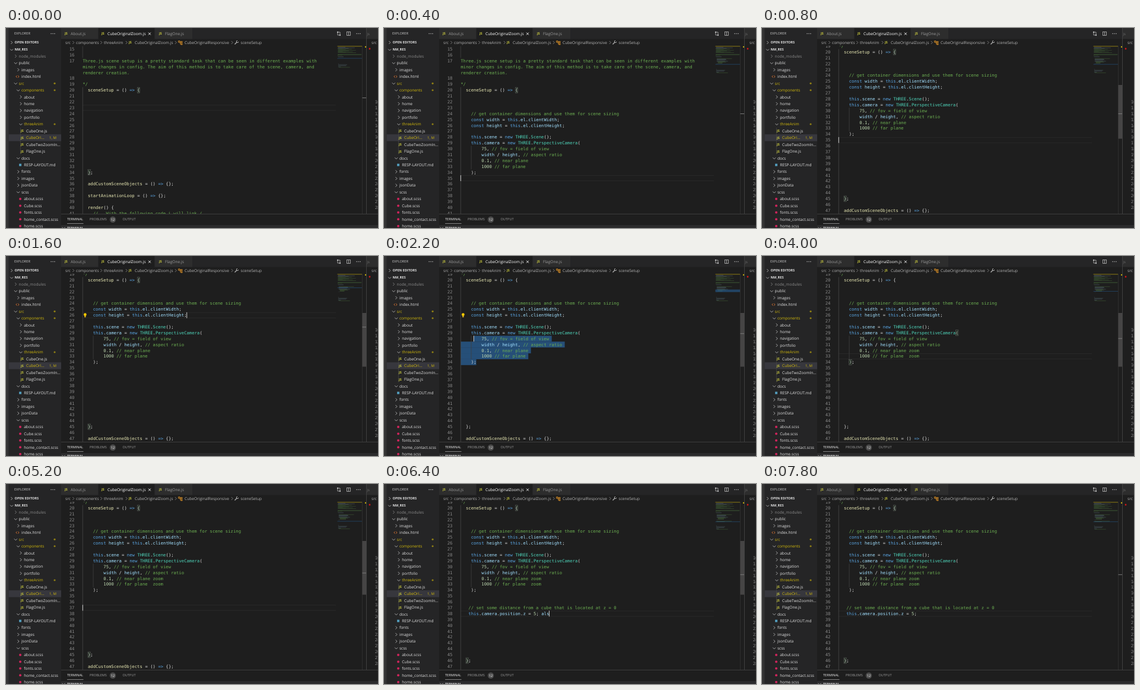
Animation, 627 px wide and 337 px high, one loop 8000 ms. Source, as an HTML page with a canvas:

```html
<!DOCTYPE html>
<html lang="en">
<head>
<meta charset="utf-8">
<title>Code editor</title>
<style>
html, body { margin: 0; width: 100%; height: 100%; overflow: hidden; background: #1e1e1e; }
canvas { display: block; }
</style>
</head>
<body>
<canvas id="stage" width="627" height="337"></canvas>
<script>
const g = document.getElementById('stage').getContext('2d');
const LOOP = 8000, STEP = 200;
const UI = '"Open Sans", "Noto Sans", sans-serif';
const MONO = '7.285px "DejaVu Sans Mono", monospace';
const CW = 4.386, LH = 9.887, CODE_X = 129.2, TOP = 30, BOTTOM = 313;
const WARN = '#d0b80c', JS = '#d6d640', GREEN = '#6cae52', TEXT = '#e0e0e0';

// ---------- drawing helpers ----------
function box(x, y, w, h, color) {
  g.fillStyle = color;
  g.fillRect(x, y, w, h);
}
function line(color, width, ...pts) {
  g.strokeStyle = color;
  g.lineWidth = width;
  g.beginPath();
  for (let i = 0; i < pts.length; i += 2) g.lineTo(pts[i], pts[i + 1]);
  g.stroke();
}
function dot(x, y, r, color) {
  g.fillStyle = color;
  g.beginPath();
  g.arc(x, y, r, 0, 7);
  g.fill();
}
function label(s, x, y, color = TEXT, size = 6.6, weight = 400) {
  g.font = `${weight} ${size}px ${UI}`;
  g.fillStyle = color;
  g.fillText(s, x, y + size * 0.355);
}
function chevron(x, y, open, color = '#c5c5c5') {
  if (open) line(color, 0.8, x - 2.5, y - 1, x, y + 1.5, x + 2.5, y - 1);
  else line(color, 0.8, x - 1.2, y - 2.5, x + 1.3, y, x - 1.2, y + 2.5);
}
const jsIcon = (x, y) => label('JS', x, y, JS, 5.3, 700);
function dots(x, y) {
  for (let i = -1; i < 2; i++) dot(x + i * 2.9, y, 0.7, '#c5c5c5');
}

// ---------- file tree: depth, kind, name ----------
const tree = `1 > node_modules
1 v public
2 > images
2 h index.html
1 v src *
2 v components *
3 > about
3 > home
3 > navigation
3 > portfolio
3 v threeAnim *
4 j CubeOne.js
4 j CubeOri… !
4 j CubeTwoZoomIn…
4 j FlagOne.js
2 v docs
3 m RESP-LAYOUT.md
2 > fonts
2 > images
2 > jsonData
2 v scss
3 s about.scss
3 s Cube.scss
3 s fonts.scss
3 s home_contact.scss
3 s home.scss`.split('\n').map(r => r.split(' '));

function drawSidebar() {
  box(0, 0, 93, 337, '#252526');
  box(0, 0, 4.5, 337, '#333333');
  label('EXPLORER', 14, 9.5, '#c8c8c8', 5.6);
  dots(79, 9.5);
  chevron(9.5, 24.5, false);
  label('OPEN EDITORS', 14.5, 24.5, TEXT, 5.6, 700);
  chevron(9.5, 36.5, true);
  label('NM_RES', 14.5, 36.5, TEXT, 5.6, 700);
  box(4.5, 179.2, 88.5, 11.4, '#37373d');
  line('#4a4a4a', 0.7, 24.3, 168, 24.3, 213);
  tree.forEach(([depth, kind, name, mark], i) => {
    const y = 47.5 + i * 11.45, x = 12 + depth * 4.3;
    const color = mark ? WARN : i ? TEXT : '#8c8c8c';
    if (kind === '>' || kind === 'v') chevron(x, y, kind === 'v', i ? '#c5c5c5' : '#8c8c8c');
    if (kind === 'j') jsIcon(25, y);
    if (kind === 'h') {
      line('#e37933', 0.9, 18.6, y - 1.8, 16.8, y, 18.6, y + 1.8);
      line('#e37933', 0.9, 20.2, y - 1.8, 22, y, 20.2, y + 1.8);
    }
    if (kind === 'm') box(22, y - 2, 4, 4, '#519aba');
    if (kind === 's') dot(24, y, 2, '#d0245c');
    const tx = kind === 'j' ? 34 : kind === 'h' ? 26 : 17.3 + depth * 4.3;
    label(name, tx, y, color);
    if (mark === '*') dot(82, y, 1.6, '#8f7f14');
    if (mark === '!') label('1, M', 73, y, WARN, 6);
  });
}

// ---------- tabs, breadcrumbs, panel ----------
function drawTabs() {
  box(93, 0, 534, 18.5, '#252526');
  box(93, 0, 62, 18.5, '#2d2d2d');
  box(156, 0, 94, 18.5, '#1e1e1e');
  box(251, 0, 63, 18.5, '#2d2d2d');
  [[99, 'About.js'], [161, 'CubeOriginalZoom.js'], [258, 'FlagOne.js']].forEach(([x, name], i) => {
    jsIcon(x, 9.5);
    label(name, x + 10, 9.3, i === 1 ? '#ffffff' : '#9c9c9c');
  });
  line('#ffffff', 0.9, 240, 7.7, 244, 11.7);
  line('#ffffff', 0.9, 244, 7.7, 240, 11.7);
  const c = '#b8b8b8';
  line(c, 0.8, 559, 8, 559, 12, 562, 12);
  line(c, 0.8, 560, 7, 563, 7, 563, 11);
  dot(559, 7, 1.2, c);
  dot(563, 12, 1.2, c);
  g.strokeRect(574.5, 6.5, 6, 6);
  line(c, 0.8, 577.5, 6.5, 577.5, 12.5);
  dots(594, 9.5);
}
function drawCrumbs() {
  const y = 24.5, c = '#b4b4b4';
  [[100, 'src'], [118, 'components'], [165, 'threeAnim'], [217, 'CubeOriginalZoom.js'],
   [301, 'CubeOriginalResponsive'], [395.5, 'sceneSetup']].forEach(([x, s]) => label(s, x, y, c));
  [113.5, 160.5, 203, 286, 381].forEach(x => chevron(x, y, false, '#8c8c8c'));
  jsIcon(207, y);
  g.strokeStyle = '#ee9d28';
  g.lineWidth = 0.8;
  g.strokeRect(290.7, 21.8, 2.3, 2.3);
  g.strokeRect(295, 22.8, 2, 1.8);
  g.strokeRect(295, 26.2, 2, 1.8);
  line('#ee9d28', 0.8, 293, 23.5, 295, 23.5);
  line('#ee9d28', 0.8, 293.7, 23.5, 293.7, 27, 295, 27);
  line('#b4b4b4', 1.2, 385.5, 27.5, 389, 24);
  g.lineWidth = 1;
  g.beginPath();
  g.arc(390, 23, 1.7, 0, 4.8);
  g.stroke();
}
function drawPanel() {
  box(93, BOTTOM, 534, 24, '#1e1e1e');
  box(93, BOTTOM, 534, 0.8, '#454545');
  label('TERMINAL', 103, 322.5, '#f0f0f0', 5.6);
  box(103, 329, 27.5, 0.7, '#b0b0b0');
  label('PROBLEMS', 141, 322.5, '#9c9c9c', 5.6);
  dot(180, 322.8, 5.2, '#4d4d4d');
  g.textAlign = 'center';
  label('12', 180, 322.8, '#ffffff', 5.6);
  g.textAlign = 'left';
  label('OUTPUT', 196.5, 322.5, '#9c9c9c', 5.6);
  box(93, 332, 534, 5, '#2b2b2c');
  chevron(97, 336.7, true);
  label('TERMINAL', 103, 336.7, TEXT, 5.4, 700);
}
function drawSecondGroup() {
  box(607, 0, 20, BOTTOM, '#1e1e1e');
  box(608, 0, 19, 18.5, '#2d2d2d');
  label('js', 608.5, 9.5, '#6b6b6b', 6);
  box(607, 0, 0.9, BOTTOM, '#444444');
  label('src', 616, 24.5, '#b4b4b4');
  dot(613, 35, 1.4, '#d01818');
  g.font = MONO;
  g.fillStyle = '#858585';
  for (let n = 10; n < 29; n++) {
    g.fillText(n, 621.7, 124.4 + (n - 10) * LH + 2.6);
  }
}

// ---------- document ----------
const intro = [
  'Three.js scene setup is a pretty standard task that can be seen in different examples with',
  'minor changes in config. The aim of this method is to take care of the scene, camera, and',
  'renderer creation.'];
const setup = s => `    // get container dimensions and use them for scene sizing
    const width = this.el.clientWidth;
    const height = this.el.clientHeight;

    this.scene = new THREE.Scene();
    this.camera = new THREE.PerspectiveCamera(
        75, // fov = field of view
        width / height, // aspect ratio
        0.1, // near plane${s.near}
        1000 // far plane${s.far}
    );`.split('\n');
const blank = n => Array(n).fill('');

// Rows are [line number, text]; wrapped rows have no number.
function buildRows(s) {
  let body = blank(13);
  if (s.pasted) {
    const rest = s.note ? [...blank(2), s.note, s.tail, ...blank(7)] : blank(10);
    body = [...blank(3), ...setup(s), ...rest];
  }
  const lines = ['', '', intro, '', '*/', '  sceneSetup = () => {', ...body, '  };', '',
    '  addCustomSceneObjects = () => {};', '', '  startAnimationLoop = () => {};', '',
    '  render() {', '    //   With the following code i will link /', '', '', ''];
  return lines.flatMap((text, i) =>
    [].concat(text).map((part, k) => [k ? 0 : i + 15, part]));
}

const NOTE = '   // set some distance from a cube that is located at z = 0';
const MOVE = '   this.camera.position.z = 5;';
const outer = { match: 'outer' }, inner = { match: 'inner' }, none = { match: '' };
// Each entry changes the editor state from its time on.
const keys = [
  [-500, { scroll: 0, line: 23, col: 0, near: '', far: '', tail: '', ...outer }],
  [400, { pasted: true, line: 35 }],
  [600, { scroll: 3.5, slider: true }],
  [800, { scroll: 6.5 }],
  [1400, { line: 26, col: 40, bulb: true }],
  [1800, { line: 33, col: 8, sel: true, ...none }],
  [2000, { line: 31, col: 6 }],
  [2200, { line: 30, col: 5 }],
  [2600, { line: 32, col: 26, sel: false, bulb: false, ...inner }],
  [2800, { near: ' z', col: 28 }],
  [3000, { near: ' zoom', col: 31 }],
  [3200, { line: 33, col: 25 }],
  [3400, { far: '  zoom', col: 31 }],
  [5000, { line: 37, col: 0, ...outer }],
  [5800, { note: NOTE, tail: '', line: 37, col: 60 }],
  [6000, { tail: MOVE, line: 38, col: 30 }],
  [6200, { tail: MOVE + ' a', col: 32 }],
  [6400, { tail: MOVE + ' als', col: 34 }],
  [6600, { tail: MOVE + ' also', col: 35 }],
  [7000, { tail: MOVE + ' a', col: 32 }],
  [7200, { tail: MOVE, col: 30, slider: false }]
];
function stateAt(t) {
  const past = keys.filter(([at]) => at <= t);
  const s = Object.assign({}, ...past.map(k => k[1]));
  s.blink = (t - past[past.length - 1][0]) % 1000 < 500;
  return s;
}

// ---------- code ----------
const TOKEN = /\/\/.*|=>|\d+(\.\d+)?|[A-Za-z]\w*|\S/g;
function tokenColor(w) {
  if (w.startsWith('//')) return GREEN;
  if (/^(const|this|new|=>)$/.test(w)) return '#5aa6e4';
  if (/^(THREE|Scene|PerspectiveCamera)$/.test(w)) return '#4ed2b8';
  if (/^(sceneSetup|addCustomSceneObjects|startAnimationLoop|render)$/.test(w)) return '#e4e4b0';
  if (/^\d/.test(w)) return '#bcd6ae';
  return /^\w/.test(w) ? '#a2e0ff' : '#dcdcdc';
}
function drawCodeLine(n, text, y) {
  const plain = n < 20;
  for (const m of text.matchAll(plain ? /\S+/g : TOKEN)) {
    g.fillStyle = plain ? GREEN : tokenColor(m[0]);
    g.fillText(m[0], CODE_X + m.index * CW, y);
  }
}
function bracket(col, y) {
  const x = CODE_X + col * CW;
  box(x, y - 4.7, CW, 9.4, 'rgba(0,100,0,0.12)');
  g.strokeStyle = '#707070';
  g.lineWidth = 0.5;
  g.strokeRect(x, y - 4.6, CW, 9.2);
}
function drawCode(s, rows) {
  const yOf = row => 35.5 + LH * (row - s.scroll);
  const yLine = n => yOf(rows.findIndex(r => r[0] === n));
  const end = rows.find(r => r[1] === '  };')[0];
  g.save();
  g.beginPath();
  g.rect(93, TOP, 507, BOTTOM - TOP);
  g.clip();

  const caretY = yLine(s.line);
  if (s.sel) {
    for (let n = s.line; n <= 34; n++) {
      const text = rows.find(r => r[0] === n)[1];
      const from = n === s.line ? s.col : 0;
      const to = text.length + (n < 34 ? 1 : 0);
      box(CODE_X + from * CW, yLine(n) - LH / 2, (to - from) * CW, LH, '#264f78');
    }
  } else {
    box(CODE_X, caretY - 4.9, 427, 0.9, '#2a2a2a');
    box(CODE_X, caretY + 4.1, 427, 0.9, '#2a2a2a');
  }
  box(128.8, yLine(15) - LH / 2, 0.8, 2 * LH, '#404040');
  box(128.8, yLine(20) - LH / 2, 0.8, 400, '#484848');
  if (s.pasted) box(146.6, yLine(30) - LH / 2, 0.8, 4 * LH, '#404040');

  if (s.match === 'outer') {
    bracket(21, yLine(20));
    bracket(2, yLine(end));
  } else if (s.match === 'inner') {
    bracket(45, yLine(29));
    bracket(4, yLine(34));
  }

  g.font = MONO;
  let current = 0;
  rows.forEach(([n, text], i) => {
    const y = yOf(i) + 2.5;
    if (n) {
      current = n;
      g.fillStyle = '#8a8a8a';
      g.fillText(n, 106.7, y);
    }
    drawCodeLine(current, text, y);
  });
  if (s.bulb) {
    const y = yLine(26);
    dot(133.3, y - 1, 2.4, '#ffcc00');
    box(132.1, y + 1, 2.4, 2.6, '#d8b020');
  }
  if (s.blink || s.sel) box(CODE_X + s.col * CW - 0.4, caretY - LH / 2, 1, LH, '#d0d0d0');
  g.restore();
}

// ---------- minimap and scrollbar ----------
function drawMinimap(s, rows) {
  const h = 0.84;
  const yOf = row => 30.5 + row * h;
  const bar = (row, from, len, color) => box(559 + from * 0.45, yOf(row), len * 0.45, 0.6, color);
  box(558.5, 30.3, 41.5, 1, '#8a7a14');
  for (let i = 2; i < 14; i++) {
    const len = 14 + (i * 37) % 61;
    bar(i, i % 3, len, i < 5 ? '#4c585a' : '#385030');
  }
  rows.forEach(([n, text], i) => {
    const len = text.trim().length;
    if (!len) return;
    const green = /\/\/|\*\//.test(text) || i < 6;
    bar(i + 14, text.length - len, len, green ? '#3c5632' : '#48595f');
  });
  const mark = rows.findIndex(r => r[0] === s.line) + 14;
  const count = s.sel ? 35 - s.line : 1;
  box(558.5, yOf(mark), 41.5, h * count, 'rgba(38,90,140,0.65)');

  box(600, TOP, 0.7, BOTTOM - TOP, '#363636');
  if (s.slider) box(600.5, 96, 6.5, 90.5, '#464545');
  const ruler = s.pasted ? 139 + (s.line - 33) * 2.75 : 117.7;
  box(600.5, ruler - 0.5, 6.5, 1, '#7c7c7c');
  box(605, 30.8, 2, 2, WARN);
}

function draw(t) {
  const s = stateAt(t), rows = buildRows(s);
  box(0, 0, 627, 337, '#1e1e1e');
  drawTabs();
  drawCrumbs();
  drawCode(s, rows);
  drawMinimap(s, rows);
  drawSecondGroup();
  drawPanel();
  drawSidebar();
}

g.textRendering = 'geometricPrecision';
function tick() {
  draw(Math.floor(performance.now() % LOOP / STEP) * STEP);
  requestAnimationFrame(tick);
}
tick();
</script>
</body>
</html>
```
